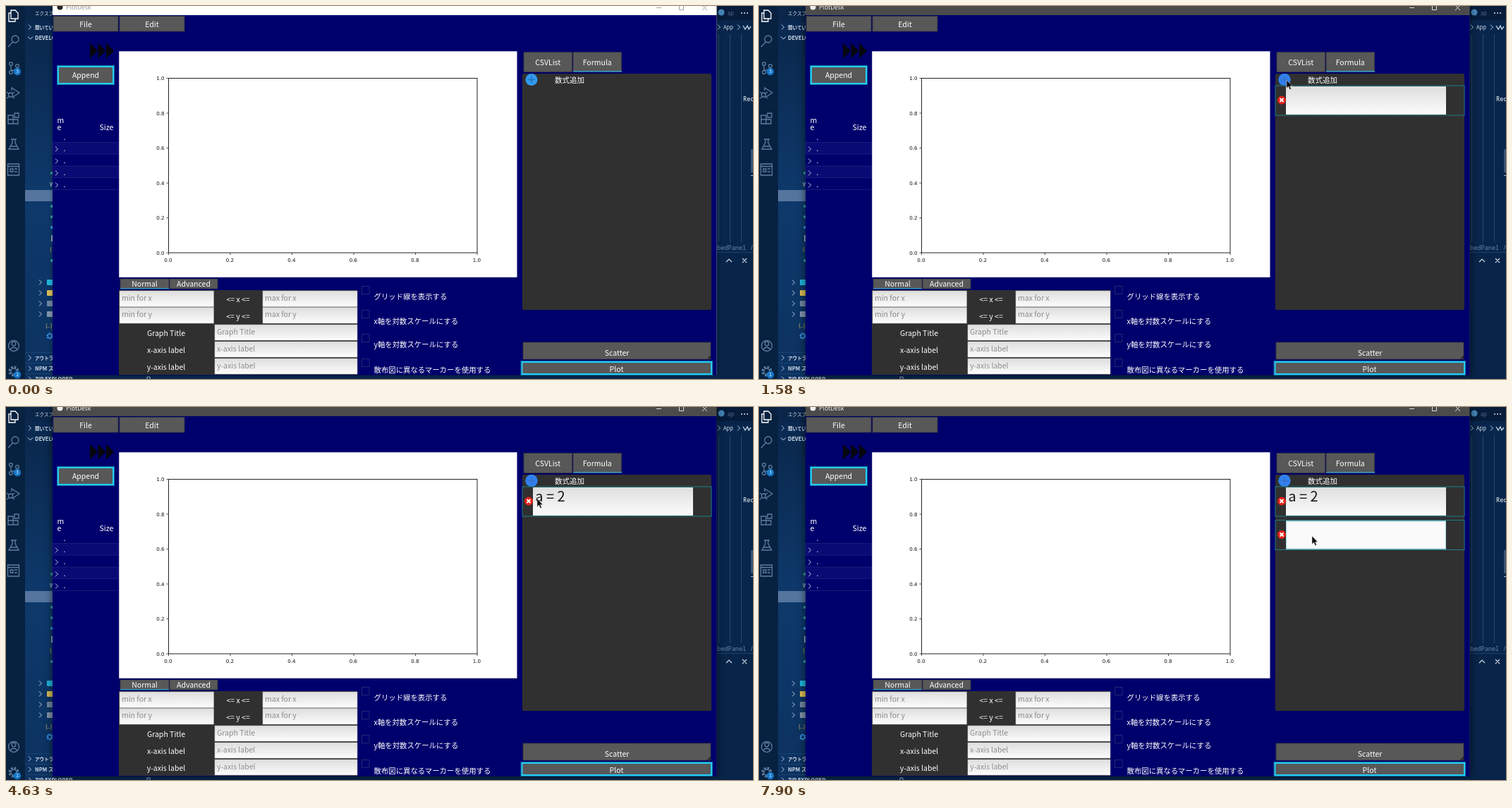
An HTML page that plays this animation: 1059x529 px, repeating every 8000 ms.

```html
<!DOCTYPE html>
<html lang="ja">
<head>
<meta charset="utf-8">
<title>PlotDesk</title>
<style>
  html, body { margin: 0; width: 100%; height: 100%; overflow: hidden; background: #08244a; }
  svg { display: block; width: 100vw; height: 100vh; }
  text { font: 10.5px "Noto Sans CJK JP", "Noto Sans CJK", "Noto Sans", sans-serif; fill: #fff; white-space: pre; }
  .mid { text-anchor: middle; }
  .hint { fill: #8c8c8c; }
  .tick { font: 7.1px "DejaVu Sans", sans-serif; fill: #111; }
  .right { text-anchor: end; }
  .formula { font-size: 20px; fill: #151515; }
  .side { font-size: 7.6px; fill: #d5e0ee; }
  .kana { font-size: 6.6px; }
  .bold { font-weight: bold; }
  .code { font: 8.6px "Noto Sans Mono", monospace; }
  .badge { font-size: 6.5px; text-anchor: middle; }
  .title { font-size: 8.6px; }
  .timed { animation: 8s step-end infinite; }
</style>
</head>
<body>
<svg id="stage" viewBox="0 0 1059 529" preserveAspectRatio="none">
  <defs>
    <linearGradient id="sidebar" x2="0" y2="1">
      <stop stop-color="#0a2548"/><stop offset=".5" stop-color="#0e396b"/><stop offset="1" stop-color="#0c3260"/>
    </linearGradient>
    <linearGradient id="field" x2="0" y2="1">
      <stop stop-color="#dedede"/><stop offset="1" stop-color="#fcfcfc"/>
    </linearGradient>
  </defs>
</svg>
<script>
const LOOP = 8000;
const css = [];
const pct = ms => `${+(ms / LOOP * 100).toFixed(4)}%`;

function keyframes(name, stops) {
  const body = stops.map(([ms, rule]) => `${pct(ms)}{${rule}}`).join('');
  css.push(`@keyframes ${name}{${body}} .${name}{animation-name:${name}}`);
}

// Visible only inside the given [from, to] spans, in ms.
function showDuring(name, ...spans) {
  const stops = spans[0][0] > 0 ? [[0, 'visibility:hidden']] : [];
  for (const [from, to = LOOP] of spans) {
    stops.push([from, 'visibility:visible']);
    if (to < LOOP) stops.push([to, 'visibility:hidden']);
  }
  keyframes(name, stops);
}

const moveTo = (name, points) =>
  keyframes(name, points.map(([ms, x, y]) => [ms, `transform:translate(${x}px,${y}px)`]));

showDuring('idle', [0, 880]);
showDuring('active', [880]);
showDuring('press', [800, 970], [1430, 1580], [2040, 2200], [5640, 5790], [6260, 6420]);
showDuring('hovered', [1430]);
showDuring('row1', [1500]);
showDuring('focus1', [2120, 4630]);
showDuring('blink1', [2120, 2680], [3060, 4630]);
showDuring('key1', [3060]);
showDuring('key2', [3610]);
showDuring('key3', [4320]);
showDuring('row2', [5790]);
showDuring('focus2', [6340]);
showDuring('blink2', [6340, 6890], [7350, 7900]);
moveTo('caret', [[0, 750.5, 117], [3060, 761, 117], [3210, 765.5, 117],
  [3610, 776.5, 117], [3850, 781.2, 117], [4320, 792.5, 117]]);
moveTo('pointer', [[0, -60, -60], [200, 800, 518], [280, 795, 478], [360, 785, 398],
  [440, 772, 300], [520, 762, 210], [600, 754, 150], [680, 750, 118], [760, 748, 105],
  [1730, 749, 108], [1810, 751, 117], [1890, 753, 127], [1960, 753, 130],
  [5020, 753, 131], [5330, 752, 127], [5410, 750, 119], [5490, 747, 111], [5560, 746, 108],
  [5870, 748, 114], [5950, 757, 132], [6030, 769, 157], [6110, 779, 175], [6190, 783, 181],
  [6500, 784, 183]]);

const LINE = { fill: 'none', stroke: '#5f7d9f', 'stroke-width': 1.3 };
const attrs = o => Object.entries(o).map(([k, v]) => ` ${k}="${v}"`).join('');
const rect = (x, y, width, height, fill, more = {}) =>
  `<rect${attrs({ x, y, width, height, fill, ...more })}/>`;
const path = (d, stroke = LINE.stroke, width = LINE['stroke-width']) =>
  `<path${attrs({ d, ...LINE, stroke, 'stroke-width': width })}/>`;
const shape = (d, fill, more = {}) => `<path${attrs({ d, fill, ...more })}/>`;
const dot = (cx, cy, r, fill) => `<circle${attrs({ cx, cy, r, fill })}/>`;
const ring = (cx, cy, r, more = {}) => `<circle${attrs({ cx, cy, r, ...LINE, ...more })}/>`;
const text = (x, y, label, cls = '', more = {}) =>
  `<text${attrs({ x, y, class: cls, ...more })}>${label.replace(/</g, '&lt;')}</text>`;
const timed = (name, content) => `<g class="timed ${name}">${content}</g>`;
const each = (list, draw) => list.map(draw).join('');

const button = (x, y, w, h, label, baseline) =>
  rect(x, y, w, h, '#585858', { stroke: '#35353d', 'stroke-width': .8 }) +
  text(x + w / 2, baseline, label, 'mid');
const glow = (x, y, w, h) =>
  rect(x - .5, y - .5, w + 1, h + 1, 'none', { stroke: '#0b6f9c' }) +
  rect(x + 1, y + 1, w - 2, h - 2, 'none', { stroke: '#25cdf3', 'stroke-width': 2 });
const field = (x, y, w, h, hint) =>
  rect(x, y, w, h, 'url(#field)', { stroke: '#b9b9b9', 'stroke-width': .5 }) +
  text(x + 3, y + 13.5, hint, 'hint');
const chevron = (x, y, color = '#b9cbe0') => path(`M${x - 2} ${y - 3.5}l3.5 3.5l-3.5 3.5`, color, 1);

function activityBar() {
  const badge = (y, n) => dot(16, y, 5.2, '#1677c8') + text(16, y + 2.4, n, 'badge');
  return rect(0, 0, 27, 529, '#072140') +
    path('M7 6h6l4 4v8H7zM7 10H4v12h9v-4', '#fff') +
    ring(13, 47, 5) + path('M9.5 51L3 58') +
    ring(7, 82, 2.4) + ring(7, 94, 2.4) + ring(16, 85, 2.4) +
    path('M7 85v6M16 88q0 3-9 3') + badge(93, '3') +
    path('M8 120v-4l11 7l-9 6') + ring(6.5, 126, 3) +
    path('M1 122l3 2M1 131l3-2M9 124l3-2M9 129l3 2') +
    path('M3 155h7v12H3zM3 161h14v6H3M12 152h6v6h-6z') +
    path('M7 189h8M9 189v5l-5 9h14l-5-9v-5M6 199h10') +
    path('M2.5 224h16v16h-16zM3 227.5h16M6 231h4v4h-4zM12 231h4M12 235h4') +
    ring(11, 482, 7.5) + ring(11, 479, 2.8) + path('M6 487q5-6 10 0') +
    ring(11, 518, 6, { 'stroke-width': 3, 'stroke-dasharray': '2.7 2' }) +
    ring(11, 518, 4) + badge(523, '1');
}

function sideBar() {
  const marks = [[237, '#35b88a'], [284, '#3ca6a6'], [299, '#3ca6a6'], [314, '#3a9af0'], [361, '#3ca6a6']];
  const folders = [[392, '#20b5dc'], [407, '#d7bd55'], [422, '#6f86a0'], [437, '#8094ab']];
  return rect(27, 0, 40, 529, 'url(#sidebar)') +
    rect(27, 22, 40, 30, '#0a2a52') +
    text(41, 12.5, 'エクスプローラー', 'side kana') +
    chevron(34, 30) + text(41, 32.5, '開いているエディター', 'side kana bold') +
    path('M31 43.5l3.5 3.5l3.5-3.5', '#dbe5f0', 1) +
    text(41, 48, 'DEVELOP', 'side bold') +
    rect(27, 261, 40, 16, '#55759f') +
    each(marks, ([y, color]) => dot(65, y, 2, color)) +
    text(62, 256, 'W', 'side') + rect(64, 325, 2, 9, '#8ca2bb') +
    text(62, 348, '{', 'side', { style: 'fill:#d9bc4a' }) +
    each(folders, ([y, color]) => chevron(49, y) + rect(58, y - 4, 9, 8, color, { rx: 1 })) +
    text(56, 456, '{..}', 'side', { style: 'fill:#d9c56a' }) +
    ring(62, 468, 3.2, { stroke: '#3a9af0', 'stroke-width': 2.4, 'stroke-dasharray': '2.5 .8' }) +
    each([491, 506, 521], y => rect(27, y, 40, .7, '#254b78')) +
    chevron(34, 499) + text(41, 501.5, 'アウトライン', 'side kana bold') +
    chevron(34, 514) + text(41, 517, 'NPM スクリプト', 'side bold') +
    chevron(34, 529) + text(41, 532, 'ZIP EXPLORER', 'side bold') +
    path('M200 529v-3h4v3', '#a9bfd8', 1);
}

function editor() {
  return rect(1007, 0, 52, 529, '#08264c') + rect(1007, 0, 52, 20, '#061c3a') +
    dot(1014, 9, 4.5, '#4584b6') + text(1023, 13, 'ap', 'side', { style: 'fill:#536e8e' }) +
    each([1043, 1047, 1051], x => dot(x, 10, 1, '#d5e0ee')) +
    chevron(1011, 30) + text(1017, 33, 'App', 'side') + chevron(1039, 30) +
    path('M1045 28l3 5l3-5l2 5l3-4', '#c8d6e8') +
    each([1010, 1026, 1042], x => rect(x, 40, .8, 295, '#315275')) +
    text(1045, 135, 'Rec', 'code') +
    rect(1056, 203, 3, 33, '#3c5575') + rect(1056, 240, 3, 1, '#b6c4d4') +
    text(1008, 346, 'bedPanel /', 'code', { style: 'fill:#6784aa' }) +
    rect(1007, 349, 52, 180, '#082448') + rect(1007, 349, 52, .7, '#2c4c75') +
    path('M1021 363l4-4l4 4M1044 358l6 6M1050 358l-6 6', '#d5e0ee', 1.1);
}

function windowFrame(name, bar, ink, shadow) {
  return timed(name,
    rect(66, -4, 941.5, 527, bar, { style: `filter:drop-shadow(0 2px ${shadow})` }) +
    dot(76.5, 1.5, 4, name === 'idle' ? '#222' : '#eee') +
    text(85, 5, 'PlotDesk', 'title', { style: `fill:${ink}` }) +
    path('M922 2.5h7M954.5 -1h6v6.5h-6zM987 -1l7 7M994 -1l-7 7', ink, .9));
}

function filePane() {
  return button(67, 14.5, 92, 21.5, 'File', 30) + button(161, 14.5, 92, 21.5, 'Edit', 30) +
    each([119, 130.5, 142], x => shape(`M${x} 52.5l11 11l-11 11z`, '#06060f')) +
    button(74, 86, 78, 24, 'Append', 102) + glow(73, 85, 80, 26) +
    text(72.5, 166, 'm') + text(72.5, 176, 'e') + text(132.5, 176, 'Size') + text(81.5, 190, '.') +
    each([193.5, 227], y => rect(66, y, 93, 16.5, '#0a0a74', { stroke: '#20207f', 'stroke-width': .8 })) +
    rect(66, 260, 93, .8, '#20207f') +
    each([203, 220, 237, 254], y => chevron(72, y, '#c8c8df') + text(81.5, y + 3, '.'));
}

function chart() {
  const left = 230.5, right = 668, top = 102.5, bottom = 350;
  const ticks = each([0, 1, 2, 3, 4, 5], i => {
    const x = left + (right - left) * i / 5, y = bottom - (bottom - top) * i / 5;
    const label = (i / 5).toFixed(1);
    return path(`M${x} ${bottom}v3M${left} ${y}h-3`, '#222', .8) +
      text(x - .5, 363, label, 'tick mid') + text(224.5, y + 2.7, label, 'tick right');
  });
  return rect(160.25, 64.25, 564.25, 320.5, '#fff') +
    rect(left, top, right - left, bottom - top, 'none', { stroke: '#222' }) + ticks;
}

function plotOptions() {
  const checks = [[403, 416, 'グリッド線を表示する'], [437, 451, 'x軸を対数スケールにする'],
    [471, 484, 'y軸を対数スケールにする'], [506, 520, '散布図に異なるマーカーを使用する']];
  const labels = [[452, 'Graph Title'], [476, 'x-axis label'], [500, 'y-axis label']];
  return button(162, 387, 69, 14, 'Normal', 398) + rect(162, 400, 69, 1.2, '#32a4ce') +
    button(232, 387, 68, 14, 'Advanced', 398) +
    rect(160, 403, 338, 120, '#303030') +
    each(['x', 'y'], (axis, i) => {
      const y = 404 + i * 23.5;
      return field(161, y, 133.5, 22.5, `min for ${axis}`) +
        text(329, y + 16, `<= ${axis} <=`, 'mid') + field(364, y, 134, 22.5, `max for ${axis}`);
    }) +
    each(labels, ([y, label]) => text(227, y + 15.5, label, 'mid') + field(296, y, 202, 22, label)) +
    each(checks, ([cy, baseline, label]) =>
      rect(504.5, cy - 5.5, 10.5, 11, 'none', { stroke: '#2a2a75', 'stroke-width': .9 }) +
      text(521.5, baseline, label, '', { style: 'font-size:10.4px' }));
}

function formulaRow(n, y, content = '') {
  return timed(`row${n}`,
    rect(732, y, 268, 42, 'none', { stroke: '#1d7f86' }) +
    dot(741, y + 20.5, 6, '#e32119') +
    path(`M738.5 ${y + 18}l5 5M743.5 ${y + 18}l-5 5`, '#fff', 1.8) +
    rect(747, y + 1, 227, 40, 'url(#field)') +
    timed(`focus${n}`, rect(747.5, y + 1.5, 226, 39, '#fafafa', { stroke: '#9fdcec' })) +
    content);
}

const plus = (fill, ink) => dot(745, 104.5, 8.5, fill) + path('M740 104.5h10M745 99.5v10', ink, 1.6);

function formulaPane() {
  const typed = each(['a', ' =', ' 2'], (s, i) => `<tspan class="timed key${i + 1}">${s}</tspan>`);
  const bar = rect(0, 0, 1, 18, '#e65a50');
  return button(734, 65.5, 68.5, 28, 'CSVList', 84) + button(804, 65.5, 68.5, 28, 'Formula', 84) +
    rect(804, 92, 69, 1.4, '#32a4ce') +
    rect(732, 96, 268, 335, '#303030', { rx: 2.5 }) +
    plus('#329bee', '#2474bd') + timed('hovered', plus('#3180ef', '#3a72c8')) +
    text(778, 109, '数式追加') +
    formulaRow(1, 113, `<text x="750.2" y="133.5" class="formula">${typed}</text>` +
      timed('blink1', timed('caret', bar))) +
    formulaRow(2, 160.5, timed('blink2', `<g transform="translate(750.5 164.5)">${bar}</g>`)) +
    button(733, 477, 266, 24, 'Scatter', 496) +
    shape('M999 495v5.5h-5.5z', '#2c2c2c') +
    button(731, 505, 269, 17, 'Plot', 519) + glow(730.5, 504, 270.5, 19);
}

const pointer = timed('pointer',
  timed('press', `<g opacity=".6">${dot(0, 0, 8.7, '#f2e63a')}</g>`) +
  shape('M0 0v11.5l2.6-2.4l1.9 4.3l1.9-.8l-1.9-4.2h3.5z', '#080808', { stroke: '#ddd', 'stroke-width': .5 }));

const style = document.createElement('style');
style.textContent = css.join('\n');
document.head.append(style);
document.getElementById('stage').insertAdjacentHTML('beforeend',
  rect(0, 0, 1059, 529, '#0a2a52') + activityBar() + sideBar() + editor() +
  windowFrame('idle', '#fff', '#999', '3px #0005') +
  windowFrame('active', '#4b4b4b', '#f0f0f0', '6px #0009') +
  rect(66, 13, 941.5, 510.5, '#00006c') +
  filePane() + chart() + plotOptions() + formulaPane() + pointer);
</script>
</body>
</html>
```
